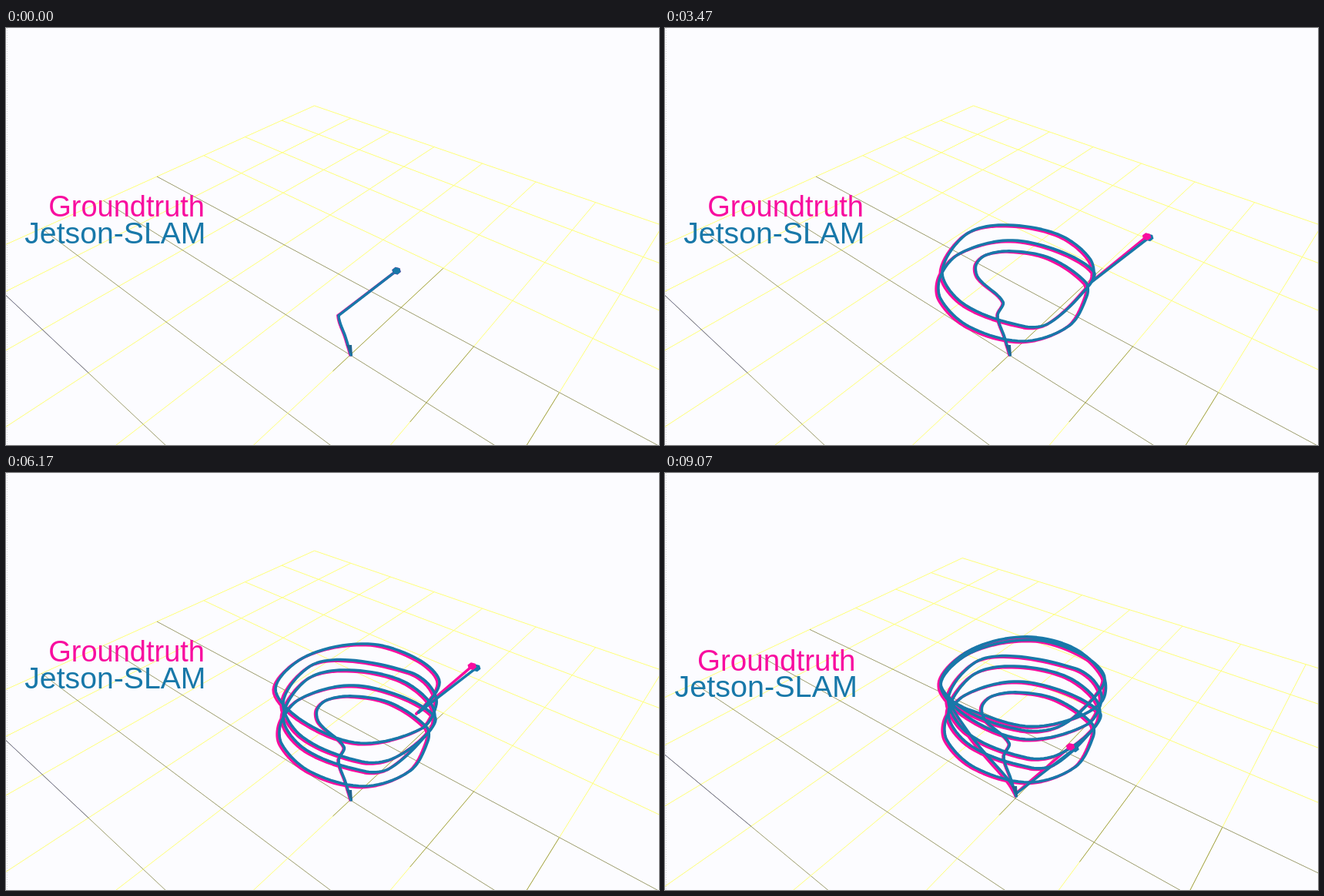
An HTML page with a canvas for the animation above (9.11 s loop, 848 by 542 pixels).

```html
<!DOCTYPE html>
<html lang="en">
<head>
<meta charset="utf-8">
<title>Trajectory comparison</title>
<style>
html, body { margin: 0; width: 100%; height: 100%; overflow: hidden; background: #fcfcff; }
canvas { display: block; }
</style>
</head>
<body>
<canvas id="stage" width="848" height="542"></canvas>
<script>
const ctx = document.getElementById('stage').getContext('2d');
const LOOP = 9110, PINK = '#f80d9f', BLUE = '#1878a9';
const lerp = (a, b, k) => a + (b - a) * k;

// Flight legs: arrival time, then the points passed on the way.
const legs = [
  [0, 448,425, 441,402, 432,374],
  [2030, 439,356, 407,325, 404,308, 417,295, 450,290, 500,299, 546,330, 548,348, 525,387,
    465,407, 395,388, 358,352, 358,322, 383,293, 445,276, 510,289, 557,317],
  [3470, 548,338, 500,383, 468,388, 390,360, 360,318, 390,269, 438,256, 510,268, 552,300, 554,330],
  [4630, 505,370, 462,375, 385,343, 360,298, 395,251, 445,243, 525,259, 550,276],
  [6170, 559,300, 540,332, 460,351, 385,322, 350,280, 390,238, 470,222, 535,242, 563,272, 536,311],
  [7370, 500,336, 455,339, 385,315, 350,278, 385,237, 455,218, 520,231, 561,268, 560,301],
  [9070, 520,325, 460,334, 385,312, 362,302, 392,350, 439,405, 449,421]
];

function buildTrack() {
  const pts = [], ends = [];
  for (const [, ...xy] of legs) {
    for (let i = 0; i < xy.length; i += 2) pts.push([xy[i], xy[i + 1]]);
    ends.push(pts.length - 1);
  }
  const dist = (p, q) => Math.hypot(q[0] - p[0], q[1] - p[1]);
  const slope = pts.map((p, i) => {
    const a = pts[Math.max(i - 1, 0)], b = pts[Math.min(i + 1, pts.length - 1)];
    const d = dist(a, p) + dist(p, b);
    return [(b[0] - a[0]) / d, (b[1] - a[1]) / d];
  });
  const track = [{ x: pts[0][0], y: pts[0][1], s: 0 }];
  const marks = [0];
  for (let i = 1; i < pts.length; i++) {
    const p = pts[i - 1], q = pts[i], len = dist(p, q);
    for (let n = 1; n <= 10; n++) {
      const u = n / 10, v = 1 - u;
      const [x, y] = [0, 1].map(c =>
        v * v * (1 + 2 * u) * p[c] + u * u * (3 - 2 * u) * q[c] +
        u * v * len * (v * slope[i - 1][c] - u * slope[i][c]));
      const last = track[track.length - 1];
      track.push({ x, y, s: last.s + Math.hypot(x - last.x, y - last.y) });
    }
    marks.push(track.length - 1);
  }
  // Constant speed within each leg
  let from = 0, t0 = -200;
  legs.forEach(([t1], n) => {
    const to = marks[ends[n]], s0 = track[from].s, s1 = track[to].s;
    for (let i = from; i <= to; i++) track[i].t = lerp(t0, t1, (track[i].s - s0) / (s1 - s0));
    from = to;
    t0 = t1;
  });
  return track;
}
const track = buildTrack();

function flown(t) {
  const next = track.findIndex(p => p.t > t);
  if (next < 0) return track;
  const a = track[next - 1], b = track[next], k = (t - a.t) / (b.t - a.t);
  return [...track.slice(0, next), { x: lerp(a.x, b.x, k), y: lerp(a.y, b.y, k) }];
}

function line(points, color, width) {
  ctx.strokeStyle = color;
  ctx.lineWidth = width;
  ctx.beginPath();
  for (const [x, y] of points) ctx.lineTo(x, y);
  ctx.stroke();
}

// Ground plane as a homography; the second view is reached at the end of the flight.
const viewA = [447, 118.4, 53.6, 425, -24.6, 21.5, 0.102, -0.083];
const viewB = [455, 117.3, 57.7, 423, -22.9, 18.6, 0.11, -0.08];

function drawGrid(k) {
  const [x0, a, b, y0, e, f, c, d] = viewA.map((v, i) => lerp(v, viewB[i], k));
  const at = (i, j) => {
    const w = 1 + c * i + d * j;
    return [(x0 + a * i + b * j) / w, (y0 + e * i + f * j) / w];
  };
  const YELLOW = '#ffff78', OLIVE = '#85854a';
  for (let n = -5; n <= 5; n++) {
    line([at(-5, n), at(5, n)], YELLOW, 1);
    line([at(n, -5), at(n, 5)], n < 2 ? OLIVE : YELLOW, n < 2 ? 0.8 : 1);
    if (n >= 0) line([at(-0.3, n), at(2 - Math.min(n, 1), n)], OLIVE, 0.8);
  }
  line([at(-2, -5), at(-2, -2)], '#6a6a9a', 0.8);
}

function label(text, color, size, x, y) {
  ctx.font = `${size}px "Liberation Sans", Arial, sans-serif`;
  ctx.textAlign = 'right';
  ctx.fillStyle = color;
  ctx.fillText(text, x, y);
}

function head(x, y, color) {
  ctx.fillStyle = color;
  ctx.beginPath();
  for (let i = 0; i < 6; i++) {
    const a = i * Math.PI / 3 + 0.3;
    ctx.lineTo(x + 6 * Math.cos(a), y + 5 * Math.sin(a));
  }
  ctx.fill();
}

function drawFlight(t, k) {
  const path = flown(t), end = path[path.length - 1];
  const lag = Math.min(t / 6000, 1) * 5.5;
  const tip = [end.x + 75, end.y - 58];
  const pinkTip = [tip[0] - lag, tip[1] - lag * 0.4];
  ctx.save();
  ctx.translate(8 * k, -5 * k);
  ctx.lineJoin = ctx.lineCap = 'round';

  // The estimate drifts from the true path once airborne.
  const truth = path.map(p => {
    const drift = Math.max(0, Math.min((p.t ?? t) / 500, 1));
    return [p.x - 1 - 1.8 * drift, p.y + 1.6 * drift];
  });
  line(truth, PINK, 3.6);
  line([truth[truth.length - 1], pinkTip], PINK, 3.4);
  line(path.map(p => [p.x, p.y]), BLUE, 3.6);
  line([[end.x, end.y], tip], BLUE, 3.4);

  ctx.fillStyle = '#20658f';
  ctx.beginPath();
  ctx.moveTo(442, 412);
  ctx.lineTo(449, 412);
  ctx.lineTo(450, 427);
  ctx.fill();

  if (t < 300) head(...pinkTip, PINK);
  head(...tip, BLUE);
  if (t >= 300) head(...pinkTip, PINK);
  ctx.restore();
}

function draw() {
  const t = performance.now() % LOOP;
  const k = Math.max(0, Math.min((t - 8430) / 640, 1));
  ctx.fillStyle = '#fcfcff';
  ctx.fillRect(0, 0, 848, 542);
  ctx.setLineDash([1, 2]);
  line([[1.5, 0], [1.5, 542]], '#d4d4d8', 1);
  ctx.setLineDash([]);
  drawGrid(k);
  label('Groundtruth', PINK, lerp(38, 38.5, k), lerp(258, 247.5, k), lerp(245, 257, k));
  label('Jetson-SLAM', BLUE, lerp(39.2, 39.6, k), lerp(259.5, 250, k), lerp(280, 291, k));
  drawFlight(t, k);
  requestAnimationFrame(draw);
}
draw();
</script>
</body>
</html>
```
